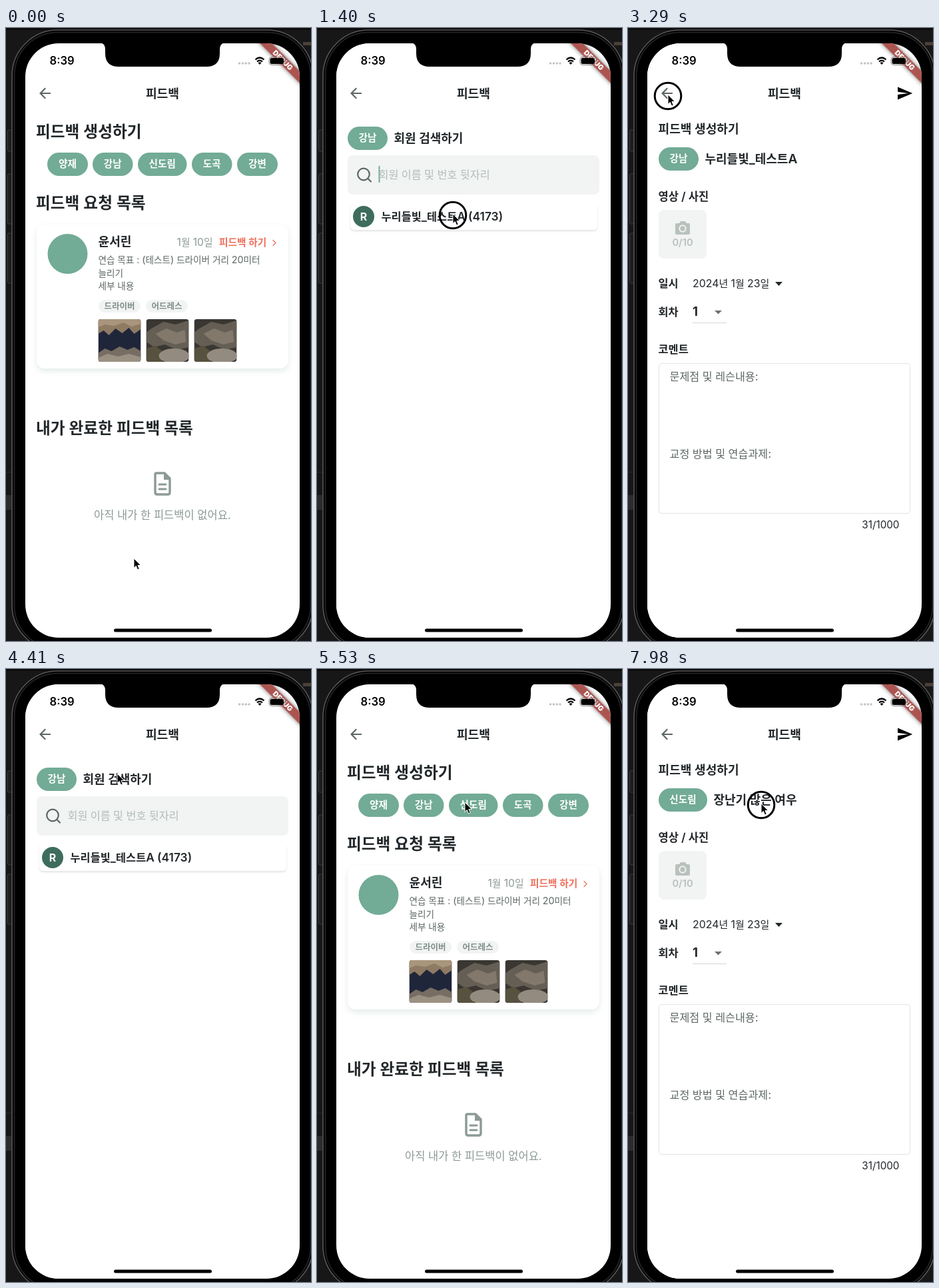
Animation of 458x920 px, one loop 8 s. Source, as an HTML page:

```html
<!DOCTYPE html>
<html lang="ko">
<head>
<meta charset="utf-8">
<style>
  html, body { margin: 0; width: 100%; height: 100%; overflow: hidden; background: #141414; }
  svg { display: block; width: 458px; height: 920px; }
  text { font-family: Inter, "Noto Sans CJK KR", sans-serif; }
</style>
</head>
<body>
<svg id="stage" viewBox="0 0 458 920"></svg>
<script>
const GREEN = '#72ab96', INK = '#22272a', SLATE = '#5c6763', MIST = '#f1f4f2', SAGE = '#8c9a94';
const LOOP = 8000, WIDTH = 412;

// y is the optical middle of the line; Latin runs are set a little larger than Hangul
const text = (x, y, size, str, fill = INK, weight = 600, anchor = 'start') =>
  `<text x="${x}" y="${y + size * .37}" font-size="${size}" fill="${fill}" font-weight="${weight}" text-anchor="${anchor}">${
    str.replace(/[!-~]+/g, run => `<tspan font-size="${size * 1.06}">${run}</tspan>`)}</text>`;
const rect = (x, y, w, h, r, fill, extra = '') =>
  `<rect x="${x}" y="${y}" width="${w}" height="${h}" rx="${r}" fill="${fill}" ${extra}/>`;
const circle = (x, y, r, fill, extra = '') => `<circle cx="${x}" cy="${y}" r="${r}" fill="${fill}" ${extra}/>`;
const path = (d, fill, extra = '') => `<path d="${d}" fill="${fill}" ${extra}/>`;
const line = (d, color, width) =>
  path(d, 'none', `stroke="${color}" stroke-width="${width}" stroke-linecap="round" stroke-linejoin="round"`);
const group = (id, body) => `<g id="${id}">${body}</g>`;

const chip = (x, y, w, label) =>
  rect(x, y, w, 35, 17.5, GREEN) + text(x + w / 2, y + 17, 14.6, label, '#fff', 600, 'middle');
const header = rect(29, 0, WIDTH, 920, 0, '#fff') +
  path('M20 11H7.83l5.59-5.59L12 4l-8 8 8 8 1.41-1.41L7.83 13H20z', SLATE, 'transform="translate(45.8 85.3) scale(1.056)"') +
  text(235, 98, 18.2, '피드백', INK, 600, 'middle');
const tag = (x, label) => rect(x, 408, 63, 19, 9.5, MIST) + text(x + 31.5, 417, 12.5, label, '#7f8e88', 600, 'middle');

const nightSky = rect(0, 0, 64, 64, 0, '#20263a') +
  path('M0 0H64V15L54 22 46 13 36 21 26 14 16 24 8 17 0 22Z', '#8f7b63') +
  path('M0 0H64V7L50 11 38 5 24 10 10 8 0 12Z', '#a8957c') +
  path('M0 51L10 44 20 48 32 41 44 46 54 42 64 48V64H0Z', '#776d62') +
  path('M0 58L14 52 30 56 46 52 64 57V64H0Z', '#9b9183');
const blossoms = rect(0, 0, 64, 64, 0, '#3a3732') +
  path('M8 14L26 4 44 8 64 2V42L46 46 28 38 12 42 0 34V20Z', '#655e54') +
  path('M14 22L30 14 46 20 58 16 60 34 44 38 26 32Z', '#82796c') +
  path('M0 44L14 40 24 48V64H0Z', '#57513f') +
  '<ellipse cx="42" cy="55" rx="23" ry="11" fill="#948b80"/>';
const photo = (x, art) => `<g transform="translate(${x} 437)" clip-path="url(#thumb)">${art}</g>`;

const listPage = header +
  text(45, 155, 23.7, '피드백 생성하기') +
  chip(62, 187, 61, '양재') + chip(130, 187, 60.5, '강남') + chip(198, 187, 73.5, '신도림') +
  chip(279, 187, 60.5, '도곡') + chip(347, 187, 61, '강변') +
  text(45, 262, 23.7, '피드백 요청 목록') +
  rect(46, 295, 378, 216, 12, '#fff', 'style="filter:drop-shadow(0 4px 5px #6a9a8830)"') +
  circle(92.5, 339, 30, GREEN) +
  text(138.5, 320, 18.1, '윤서린') +
  text(256.5, 322, 14.8, '1월 10일', SAGE, 400) +
  text(320, 322, 14.7, '피드백 하기', '#ee705b') +
  line('M401 318.5l4 4-4 4', '#ee705b', 1.3) +
  ['연습 목표 : (테스트) 드라이버 거리 20미터', '늘리기', '세부 내용']
    .map((row, i) => text(138.5, 348 + i * 19.6, 13.6, row, SLATE, 400)).join('') +
  tag(139, '드라이버') + tag(210, '어드레스') +
  photo(138.5, nightSky) + photo(210.5, blossoms) + photo(282.5, blossoms) +
  text(45, 600, 23.7, '내가 완료한 피드백 목록') +
  line('M226 668H238L246 676V697Q246 700 243 700H227Q224 700 224 697V670Q224 668 226 668Z', SAGE, 3.4) +
  path('M237 667V678H247Z', SAGE) + line('M230 685H240M230 692H240', SAGE, 3) +
  text(235, 731, 16.5, '아직 내가 한 피드백이 없어요.', SAGE, 400, 'middle');

const member = (y, name) =>
  rect(50, y - 21, 371, 41, 6, '#fff', 'style="filter:drop-shadow(0 2px 1.5px #0000001c)"') +
  circle(70, y, 16, '#3f6d5d') + text(70, y, 15, 'R', '#fff', 700, 'middle') +
  text(96.5, y, 16.4, name);

const searchPage = (branch, w, members) =>
  chip(46, 148, w, branch) + text(55.5 + w, 165.5, 18, '회원 검색하기') +
  rect(46, 191, 378, 59, 8, MIST) +
  circle(70, 219.5, 8.8, 'none', `stroke="${SLATE}" stroke-width="2.2"`) + line('M76.5 226L81 230.5', SLATE, 2.2) +
  text(92.5, 220, 16.3, '회원 이름 및 번호 뒷자리', '#b4bdb9', 500) +
  members.map((name, i) => member(283 + i * 48.5, name)).join('');

const formPage = header +
  path('M2 21L23 12 2 3V10L17 12 2 14Z', '#000', 'transform="translate(402.9 85.3) scale(1.056)"') +
  text(45.5, 151.5, 18.1, '피드백 생성하기') +
  text(45.5, 253, 16.5, '영상 / 사진') +
  rect(46, 273, 72, 73, 8, MIST) +
  path('M73 293H77L79 290H86L88 293H91Q93 293 93 295V308Q93 310 91 310H73Q71 310 71 308V295Q71 293 73 293Z', '#b9c1bd') +
  circle(82, 301, 4.7, '#b9c1bd', `stroke="${MIST}" stroke-width="2"`) +
  text(82, 321.5, 13.9, '0/10', '#b9c1bd', 600, 'middle') +
  text(45.5, 383, 16.4, '일시') + text(97, 383, 15, '2024년 1월 23일', INK, 400) +
  path('M221 381H232L226.500 387Z', INK) +
  text(45.5, 426, 16.4, '회차') + text(97, 426, 17.5, '1', INK, 700) +
  path('M130 424H141L135.500 429.500Z', '#6c7370') +
  rect(97, 442, 51, 1, 0, '#d3d8d5') +
  text(45.5, 482, 16.4, '코멘트') +
  rect(46.5, 503.5, 377, 225, 4, '#fff', 'stroke="#e0e4e2"') +
  text(62.5, 523.5, 16.2, '문제점 및 레슨내용:', SLATE, 400) +
  text(62.5, 639.5, 16.2, '교정 방법 및 연습과제:', SLATE, 400) +
  text(407.5, 746, 14.4, '31/1000', INK, 400, 'end');
const recipient = (branch, w, name) => chip(46, 179, w, branch) + text(55.5 + w, 196.5, 18, name);

const banner = `<g transform="translate(441 23) rotate(45) scale(1.056)">` +
  rect(-50, 28, 100, 12, 0, '#ac5450', 'style="filter:drop-shadow(0 0 3px #0008)"') +
  text(0, 34, 9.6, 'DEBUG', '#fff', 900, 'middle') + '</g>';
const statusBar = text(65.5, 49, 15.7, '8:39', '#000') +
  [350.5, 355.5, 360.3, 365].map(x => circle(x, 53, 1.8, '#c4c4c4')).join('') +
  path('M374.500 47.500Q381 41.500 387.500 47.500M377 50.500Q381 47 385 50.500', 'none', 'stroke="#000" stroke-width="2.2"') +
  path('M378.500 52.300Q381 50.300 383.500 52.300L381 55Z', '#000') +
  rect(395, 43.5, 23.5, 12, 4, 'none', 'stroke="#8a8080"') + rect(396.5, 45, 20.5, 9, 2.5, '#000') +
  rect(419.5, 47.5, 1.5, 4, .7, '#8a8080');

const backdrop = rect(0, 0, 458, 920, 0, '#171717') + rect(0, 0, 458, 3, 0, '#0c0c0c') +
  rect(0, 701, 8, 22, 0, '#2c2c2c') + rect(0, 666, 8, 1, 0, '#2a2a2a') + rect(446, 21, 12, 5, 0, '#4a4038') +
  [[153, 32], [219, 75], [308, 75]].map(([y, h]) => rect(2.5, y, 7, h, 2, '#1d1d1d', 'stroke="#3d3d3d"')).join('') +
  rect(9, 3, 452, 932, 69, '#000', 'stroke="#585858" stroke-width="1.6"') +
  rect(12.5, 6.5, 445, 925, 65, '#000', 'stroke="#202020" stroke-width="2"');

const stage = document.getElementById('stage');
stage.innerHTML = `<defs>
    <clipPath id="screen">${rect(29, 23, WIDTH, 892, 50, '#000')}</clipPath>
    <clipPath id="thumb">${rect(0, 0, 64, 64, 4, '#000')}</clipPath>
  </defs>` + backdrop +
  `<g clip-path="url(#screen)">` +
  group('list', listPage) +
  group('search', header +
    group('searchA', searchPage('강남', 60, ['누리들빛_테스트A (4173)']) + group('caret', rect(92.5, 207, 2, 25, 0, GREEN))) +
    group('searchB', searchPage('신도림', 73, ['장난기 많은 여우', '온다미루 (6204)']))) +
  group('form', formPage +
    group('formA', recipient('강남', 60, '누리들빛_테스트A')) +
    group('formB', recipient('신도림', 73, '장난기 많은 여우'))) +
  banner + statusBar + '</g>' +
  path('M141 22Q149 23 149 32V38Q149 58 169 58H301Q321 58 321 38V32Q321 23 329 22Z', '#000') +
  rect(162, 901.5, 147, 5, 2.5, '#000') +
  group('pointer', group('ring', circle(0, 2, 19.8, 'none', 'stroke="#000" stroke-width="3"')) +
    path('M0 0V14.500L3.300 11.400 5.600 17 8.200 15.900 5.900 10.400H10.400Z', '#000', 'stroke="#fff" stroke-width="1"'));

const part = Object.fromEntries([...stage.querySelectorAll('g[id]')].map(g => [g.id, g]));
const clamp = v => Math.min(1, Math.max(0, v));
const glide = (t, start) => 1 - (1 - clamp((t - start) / 500)) ** 4;
const place = (el, x, y = 0) => el.setAttribute('transform', `translate(${x} ${y})`);
const show = (el, on) => el.style.display = on ? '' : 'none';

// pointer stops: time, x, y
const stops = [
  [0, 192, 796], [210, 169, 212], [1000, 169, 212], [1280, 204, 279], [1560, 204, 279],
  [2200, 182, 308], [3120, 60, 100], [3560, 60, 100], [4400, 167, 157], [4550, 167, 157],
  [4940, 62, 100], [5060, 62, 100], [5500, 222, 200], [6100, 222, 200], [6580, 200, 282],
  [7000, 200, 282], [7450, 200, 205], [7700, 200, 202], [LOOP, 200, 202]
];
const presses = [[210, 350], [1400, 1540], [3290, 3430], [4970, 5060], [5670, 5810], [6650, 6790], [7840, LOOP]];

function pointerAt(t) {
  const i = stops.findIndex(s => s[0] > t);
  const [t0, x0, y0] = stops[i - 1], [t1, x1, y1] = stops[i];
  const u = (t - t0) / (t1 - t0), e = u * u * (3 - 2 * u);
  return [x0 + (x1 - x0) * e, y0 + (y1 - y0) * e];
}

function draw(now) {
  const t = now % LOOP;
  const search = glide(t, 410) - glide(t, 5040) + glide(t, 5880);
  const form = glide(t, 1610) - glide(t, 3500) + glide(t, 6860);
  place(part.list, -search * WIDTH / 3);
  place(part.search, (1 - search) * WIDTH - form * WIDTH / 3);
  place(part.form, (1 - form) * WIDTH);

  const second = t > 5700;
  show(part.searchA, !second);
  show(part.formA, !second);
  show(part.searchB, second);
  show(part.formB, second);
  show(part.caret, t > 880 && t < 2300);

  place(part.pointer, ...pointerAt(t));
  show(part.ring, presses.some(([on, off]) => t >= on && t < off));
  requestAnimationFrame(draw);
}
requestAnimationFrame(draw);
</script>
</body>
</html>
```
